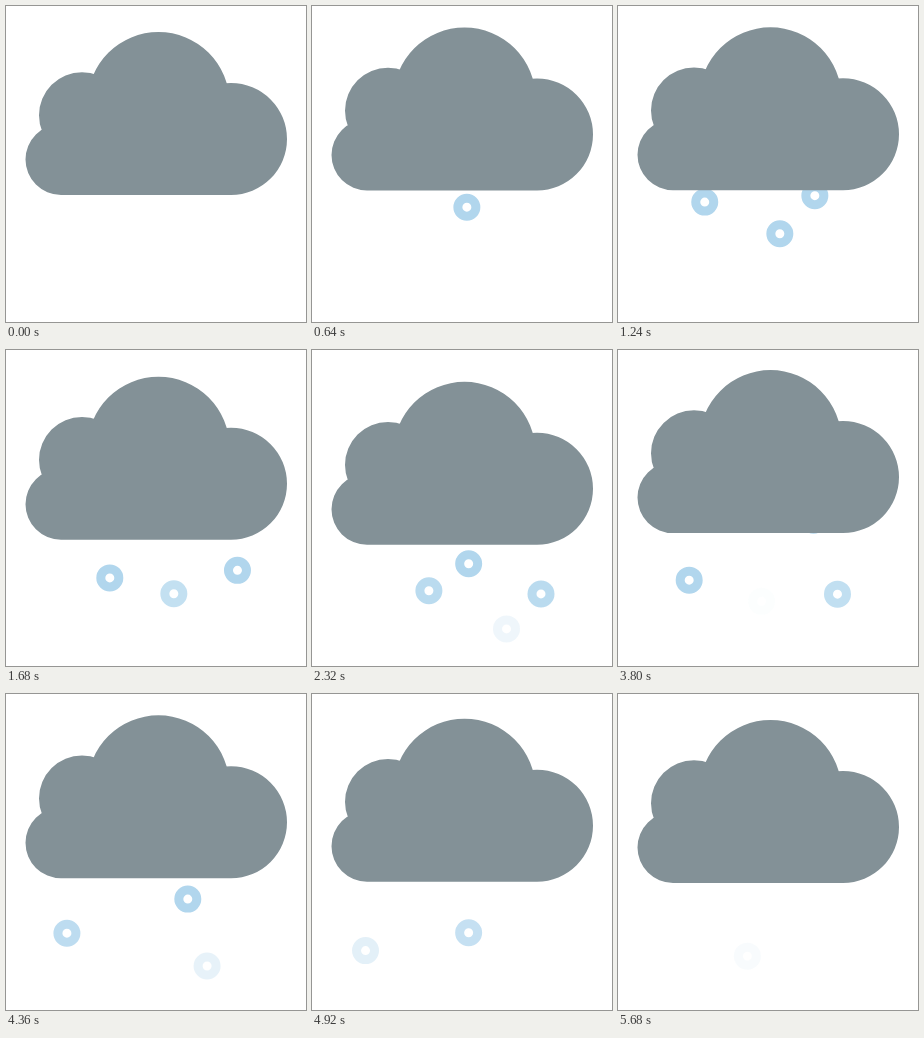
Animation of 300x316 px, one loop 5.76 s. Source, as an HTML page with a canvas:

```html
<!DOCTYPE html>
<html lang="en">
<head>
<meta charset="utf-8">
<title>Hail cloud</title>
<style>
  html, body { margin: 0; width: 100%; height: 100%; overflow: hidden; background: #fff; }
  canvas { display: block; }
</style>
</head>
<body>
<canvas id="stage" width="300" height="316"></canvas>
<script>
const ctx = document.getElementById('stage').getContext('2d');
const LOOP = 5760, STEP = 40, LAST = 5680;
const LIFE = 2400, FADE = 1150;

// Cloud height as [ms, offset]
const bob = [[0, 0], [960, -6], [2280, 5.8], [3900, -6], [5380, 0]];

// Circles of the cloud as [x, y, radius]
const puffs = [[55, 153.5, 35.5], [76, 109.2, 43], [152.5, 97, 71], [225, 133, 56]];

// Every hailstone drifts along one Bezier curve during LIFE
const stones = [
  { end: 2560, x: [139, 179, 138, 214], y: [164, 244, 220, 300] },
  { end: 3340, x: [76, 101, 164, 55], y: [154, 294, 194, 292] },
  { end: 3340, x: [149, 307, 208, 180], y: [156, 263, 221, 299] },
  { end: 3840, x: [150, 163, 155, 143], y: [145, 246, 219, 253] },
  { end: 4710, x: [215, 251, 218, 188], y: [170, 212, 248, 290] },
  { end: 5340, x: [92, 70, 55, 50], y: [176, 272, 202, 290] },
  { end: 5780, x: [190, 218, 136, 128], y: [150, 180, 267, 262] }
];

function bezier([a, b, c, d], u) {
  const v = 1 - u;
  return a * v * v * v + 3 * b * u * v * v + 3 * c * u * u * v + d * u * u * u;
}

function cloudOffset(t) {
  const next = bob.findIndex(key => key[0] > t);
  if (next < 0) return 0;
  const [t0, y0] = bob[next - 1], [t1, y1] = bob[next];
  return y0 + (y1 - y0) * (1 - Math.cos(Math.PI * (t - t0) / (t1 - t0))) / 2;
}

function drawStone({ end, x, y }, t) {
  const left = end - t, u = 1 - left / LIFE;
  if (u < 0 || u >= 1) return;
  ctx.globalAlpha = Math.min(1, left / FADE);
  ctx.beginPath();
  ctx.arc(bezier(x, u), bezier(y, u), 9, 0, 2 * Math.PI);
  ctx.stroke();
  ctx.globalAlpha = 1;
}

function drawCloud(dy) {
  ctx.beginPath();
  for (const [x, y, r] of puffs) {
    ctx.moveTo(x + r, y + dy);
    ctx.arc(x, y + dy, r, 0, 2 * Math.PI);
  }
  ctx.rect(55, 110 + dy, 170, 79);
  ctx.fill();
}

function draw(now) {
  const t = Math.min(LAST, Math.floor((now % LOOP) / STEP) * STEP);
  ctx.clearRect(0, 0, 300, 316);
  ctx.strokeStyle = '#b1d6ed';
  ctx.lineWidth = 9;
  for (const stone of stones) drawStone(stone, t);
  ctx.fillStyle = '#839197';
  drawCloud(cloudOffset(t));
}

const start = performance.now();
function tick() {
  draw(performance.now() - start);
  requestAnimationFrame(tick);
}
tick();
</script>
</body>
</html>
```
